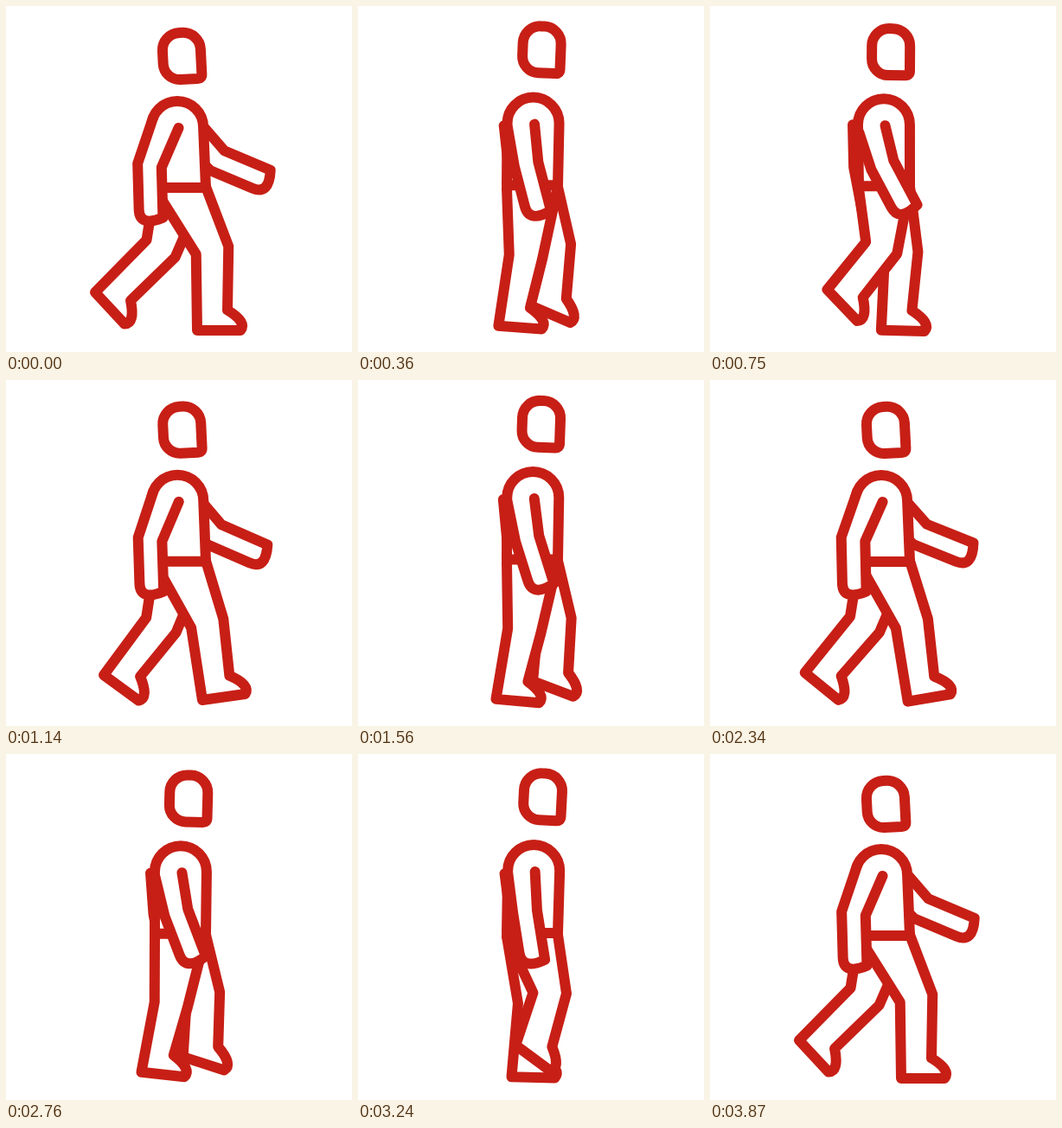
Recreate the animation shown at these times as an HTML page. Size 400 by 400 pixels, loop 3.9 s.

```html
<!DOCTYPE html>
<html lang="en">
<head>
<meta charset="utf-8">
<title>Walking figure</title>
<style>
html, body { margin: 0; width: 100%; height: 100%; overflow: hidden; background: #fff; }
svg { display: block; width: 100vw; height: 100vh; }
path { fill: #fff; stroke: #c71f16; stroke-width: 12; stroke-linecap: round; stroke-linejoin: round; }
</style>
</head>
<body>
<svg viewBox="0 0 400 400">
  <path id="farArm"/>
  <path id="farLeg"/>
  <path id="nearLeg"/>
  <path id="torso"/>
  <path id="nearArm"/>
  <path id="head" d="M-22-7A20 20 0 0 1-2-27H2A20 20 0 0 1 22-7V22Q22 27 17 27H-3A19 19 0 0 1-22 8Z"/>
</svg>
<script>
const LOOP = 3900, STEP = 30, CYCLE = 1185, START = 40, BRAKE = 3240, END = 3870, STRIDES = 3;
const RAD = Math.PI / 180;

// Key poses of one leg: foot pitch in degrees, knee and heel in stage units
const GAIT = [
  { at: 0,   knee: [238.5, 282.5], heel: [221, 375], pitch: 0 },    // flat
  { at: .31, knee: [191, 290],     heel: [157, 368], pitch: 6 },    // passing
  { at: .5,  knee: [179, 280.5],   heel: [103, 331], pitch: 47 },   // push off
  { at: .62, knee: [199, 279.5],   heel: [137, 328], pitch: 46 },   // lift
  { at: .72, knee: [222, 276.5],   heel: [183, 337], pitch: 36 },   // swing
  { at: .96, knee: [233.5, 281.5], heel: [229, 372], pitch: -10 }   // heel strike
];

const el = id => document.getElementById(id);
const put = (id, d) => el(id).setAttribute('d', d);
const pt = p => p[0].toFixed(2) + ' ' + p[1].toFixed(2);
const add = (a, b, k = 1) => [a[0] + b[0] * k, a[1] + b[1] * k];
const down = deg => [Math.sin(deg * RAD), Math.cos(deg * RAD)];     // limb leaning forward by deg
const across = deg => [Math.cos(deg * RAD), -Math.sin(deg * RAD)];  // from its back to its front

// Smooth closed curve through the key poses
function pose(phase) {
  const n = GAIT.length, p = phase - Math.floor(phase);
  const key = i => GAIT[(i + n) % n];
  const time = i => key(i).at + Math.floor(i / n);
  let i = n - 1;
  while (GAIT[i].at > p) i--;
  const gap = time(i + 1) - time(i), u = (p - time(i)) / gap;
  const mix = get => {
    const slope = j => (get(key(j + 1)) - get(key(j - 1))) / (time(j + 1) - time(j - 1)) * gap;
    const a = get(key(i)), b = get(key(i + 1)), s = slope(i), e = slope(i + 1);
    return a + u * (s + u * (3 * (b - a) - 2 * s - e + u * (2 * (a - b) + s + e)));
  };
  const point = name => [mix(k => k[name][0]), mix(k => k[name][1])];
  return { knee: point('knee'), heel: point('heel'), pitch: mix(k => k.pitch) };
}

// Steady walk with a soft start and a long slow-down into the first pose
function strides(t) {
  if (t < START) return t * t / (2 * START) / CYCLE;
  const steady = s => (s - START / 2) / CYCLE;
  if (t < BRAKE) return steady(t);
  const left = STRIDES - steady(BRAKE), span = END - BRAKE;
  const u = Math.min(1, (t - BRAKE) / span);
  return STRIDES - left * (1 - u) ** (span / CYCLE / left);
}

// The foot is rigid; the knee line halves the angle between thigh and shin
function legPath(phase) {
  const { knee, heel, pitch } = pose(phase);
  const foot = (x, y) => pt(add(add(heel, across(-pitch), x), down(-pitch), y));
  const lean = (from, to) => Math.atan2(to[0] - from[0], to[1] - from[1]) / RAD;
  const sole = add(heel, across(-pitch), 18);
  const front = across((lean([201.5, 210], knee) + lean(knee, sole)) / 2);
  return `M172 211L${pt(add(knee, front, -19.3))}L${pt(heel)}L${foot(50, 0)}` +
    `Q${foot(58, -9.4)} ${foot(35, -23.5)}L${pt(add(knee, front, 19.3))}L231 209`;
}

// Both joints follow one swing that is sharpest at its ends
function armPath(phase, shoulder, shift) {
  const u = -Math.cos(2 * Math.PI * (phase + .025)), uu = u * u, swing = uu * u;
  const upper = 6 + 6 * uu + 33 * swing;
  const fore = 9 + 26 * uu + 34 * swing;
  const elbow = add(add(shoulder, across(upper), -15), down(upper), 46 - 7 * swing);
  const fold = across((upper + fore) / 2);
  const outer = add(elbow, fold, -14), inner = add(elbow, fold, 14);
  const along = (p, length) => add(p, down(fore), length);
  const wrist = 46 + 7 * uu;
  const at = p => pt([p[0] + shift, p[1]]);
  return `M${at(add(shoulder, across(upper), -30))}L${at(outer)}L${at(along(outer, wrist))}` +
    `Q${at(along(outer, wrist + 21))} ${at(along(inner, 58))}L${at(inner)}L${at(add(shoulder, [1.5, 1]))}`;
}

function draw(t) {
  const c = strides(t);
  const bob = Math.cos(4 * Math.PI * (c + .02));
  const shoulder = [200.6 - 2.6 * bob, 137.5 + 2.5 * bob];
  const waist = 208.5 + 1.5 * bob;
  const reach = 36 * (.5 + .5 * Math.cos(2 * Math.PI * c)) ** 3 - 6;
  put('farArm', armPath(c + .5, shoulder, reach));
  put('farLeg', legPath(c + .5));
  put('nearLeg', legPath(c));
  put('torso', `M172 ${waist}L${pt(add(shoulder, [-30, 0]))}` +
    `A30 30 0 0 1 ${pt(add(shoulder, [30, 0]))}L231 ${waist}Z`);
  put('nearArm', armPath(c, shoulder, 0));
  el('head').setAttribute('transform',
    `translate(${pt([208.4 - 5.3 * bob, 53.7 + 4.3 * bob])}) rotate(${-3 * bob})`);
}

const begin = performance.now();
function tick() {
  const t = (performance.now() - begin) % LOOP;
  draw(Math.floor(t / STEP) * STEP);
  requestAnimationFrame(tick);
}
tick();
</script>
</body>
</html>
```
